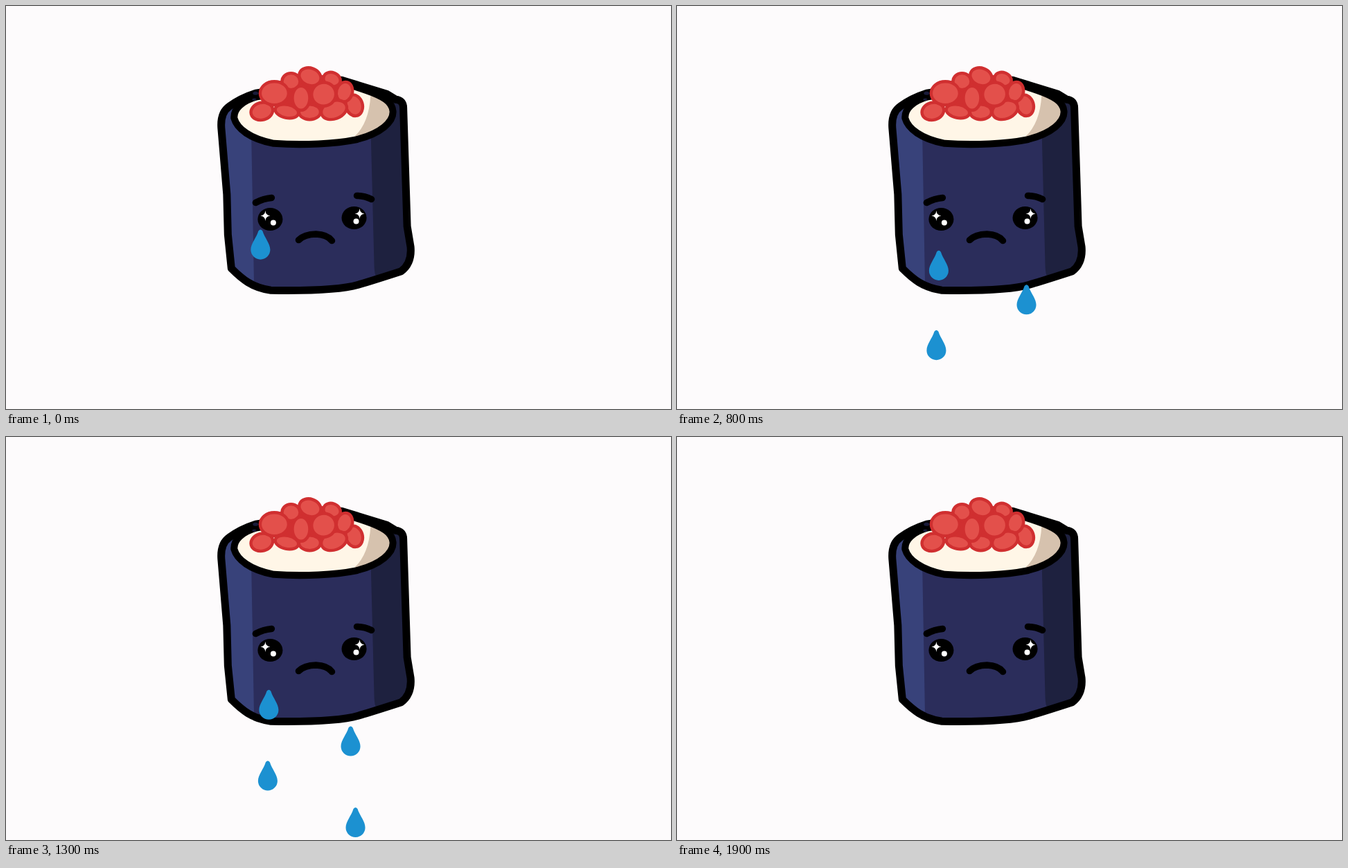
These frames come from a looping animation (960 px wide and 583 px high, 1930 ms). An HTML page:

```html
<!DOCTYPE html>
<html lang="en">
<head>
<meta charset="utf-8">
<title>Crying sushi roll</title>
<style>
  html, body { margin: 0; width: 100%; height: 100%; overflow: hidden; background: #fdfbfc; }
  svg { display: block; width: 100%; height: 100%; }
  .line { fill: none; stroke: #000; stroke-width: 11; stroke-linecap: round; stroke-linejoin: round; }
  .face { stroke-width: 9.5; }
  .roe { fill: #e3504b; stroke: #d02f30; stroke-width: 4.4; }
</style>
</head>
<body>
<svg viewBox="0 0 959 582" preserveAspectRatio="none">
  <defs>
    <path id="body" d="M360 126Q338 133 322 145Q309 154 310.500 176L318.500 272L320 330L325 379C340 394 355 407 382 410.500Q475 412 508 402.500Q530 396 570 383C582 374 584.500 360 583.500 348L578.500 318L573 147Q573 136 562 135L549 127L484 107Z"/>
    <path id="rim" d="M362 131C340 137 328 149 329 162C333 177 352 192 386 198.500C430 201.500 475 199 505 193C541 184 559 167 558 152C557 138 543 130 520 122L484 110Z"/>
    <path id="sparkle" d="M0 -7.500Q.5 -.5 7 0Q.5 .5 0 7.500Q-.5 .5 -7 0Q-.5 -.5 0 -7.500Z"/>
    <path id="drop" d="M-3 2Q0 -2 3 2C6 12 14 20 14 29A14 14 0 0 1 -14 29C-14 20 -6 12 -3 2Z" fill="#1c91d1"/>
    <clipPath id="inBody"><use href="#body"/></clipPath>
    <clipPath id="inRim"><use href="#rim"/></clipPath>
  </defs>

  <!-- seaweed -->
  <g clip-path="url(#inBody)">
    <path fill="#2b2d5b" d="M300 90H600V420H300Z"/>
    <path fill="#38427a" d="M300 90H350L354 198L358 420H300Z"/>
    <path fill="#1e213f" d="M523 90H600V420L570 384L535 394Q531 387 531 375L526 180Z"/>
  </g>
  <use href="#body" class="line"/>

  <!-- rice -->
  <use href="#rim" fill="#fff6e7"/>
  <path clip-path="url(#inRim)" fill="#d6c2ae" d="M526 110Q528 166 502 189L560 190V110Z"/>
  <use href="#rim" class="line" style="stroke-width:10"/>
  <g fill="#191b3a">
    <ellipse cx="360" cy="126" rx="4" ry="2.500"/>
    <ellipse cx="358" cy="135" rx="3" ry="1.800"/>
  </g>

  <!-- roe, back to front -->
  <g class="roe">
    <path fill="#d02f30" d="M380 120L410 102H470L494 118L495 145L465 152L425 150L395 144Z"/>
    <ellipse cx="411" cy="109" rx="13" ry="12"/>
    <ellipse cx="470" cy="106" rx="12.500" ry="10" transform="rotate(20 470 106)"/>
    <ellipse cx="438.500" cy="102" rx="16" ry="12.500" transform="rotate(20 438 102)"/>
    <ellipse cx="502" cy="143.500" rx="12" ry="15.500" transform="rotate(-15 502 143)"/>
    <ellipse cx="488" cy="124" rx="11.500" ry="14.500" transform="rotate(15 488 124)"/>
    <ellipse cx="405" cy="152" rx="17" ry="9.500" transform="rotate(12 405 152)"/>
    <ellipse cx="438" cy="153" rx="15.500" ry="11"/>
    <ellipse cx="473" cy="150" rx="19" ry="13" transform="rotate(-20 473 150)"/>
    <ellipse cx="369" cy="152" rx="16" ry="12.500" transform="rotate(-15 369 152)"/>
    <ellipse cx="425.500" cy="133" rx="12.500" ry="17.500"/>
    <ellipse cx="458" cy="127.500" rx="17.500" ry="17" transform="rotate(-20 458 127)"/>
    <ellipse cx="387" cy="126" rx="20.500" ry="17"/>
  </g>

  <!-- face -->
  <g class="line face">
    <path d="M360 284Q371 278 383 277"/>
    <path d="M506 274Q517 274 527 279"/>
    <path d="M422 338Q430 330 447 329.500Q463 330 470 339"/>
  </g>
  <ellipse cx="381" cy="308" rx="18" ry="16.500"/>
  <ellipse cx="502" cy="306" rx="18" ry="16.500"/>
  <g fill="#fff">
    <use href="#sparkle" x="374" y="303"/>
    <use href="#sparkle" x="510" y="300"/>
    <circle cx="385.500" cy="313" r="4"/>
    <circle cx="505" cy="311" r="4"/>
  </g>

  <g id="tears"></g>
</svg>
<script>
  const LOOP = 1930, STEP = 100, EYE_Y = 323;

  // Left tears gather speed; right tears fall evenly.
  const LEFT = 1.25, RIGHT = 1;

  // birth counts steps; drift bends the path sideways.
  const tears = [
    { birth: 0, x: 367, speed: 10.8, power: LEFT, drift: 0.11 },
    { birth: 6, x: 377.5, speed: 12.7, power: LEFT, drift: 0 },
    { birth: 11, x: 379, speed: 17.7, power: LEFT, drift: 0 },
    { birth: 5, x: 504, speed: 26.5, power: RIGHT, drift: 0 },
    { birth: 9, x: 501, speed: 23.7, power: RIGHT, drift: -0.25 }
  ];

  for (const tear of tears) {
    tear.node = document.createElementNS("http://www.w3.org/2000/svg", "use");
    tear.node.setAttribute("href", "#drop");
    document.getElementById("tears").append(tear.node);
  }

  function draw(now) {
    const step = Math.floor((now % LOOP) / STEP);
    const lastStep = Math.floor(LOOP / STEP);
    for (const { node, birth, x, speed, power, drift } of tears) {
      const age = step - birth;
      const visible = age >= 0 && step < lastStep;
      node.style.display = visible ? "" : "none";
      if (!visible) continue;
      const tipX = x + drift * age ** 2;
      const tipY = EYE_Y + speed * age ** power;
      node.setAttribute("transform", `translate(${tipX} ${tipY})`);
    }
  }

  const start = performance.now();
  function tick() {
    draw(performance.now() - start);
    requestAnimationFrame(tick);
  }
  tick();
</script>
</body>
</html>
```
